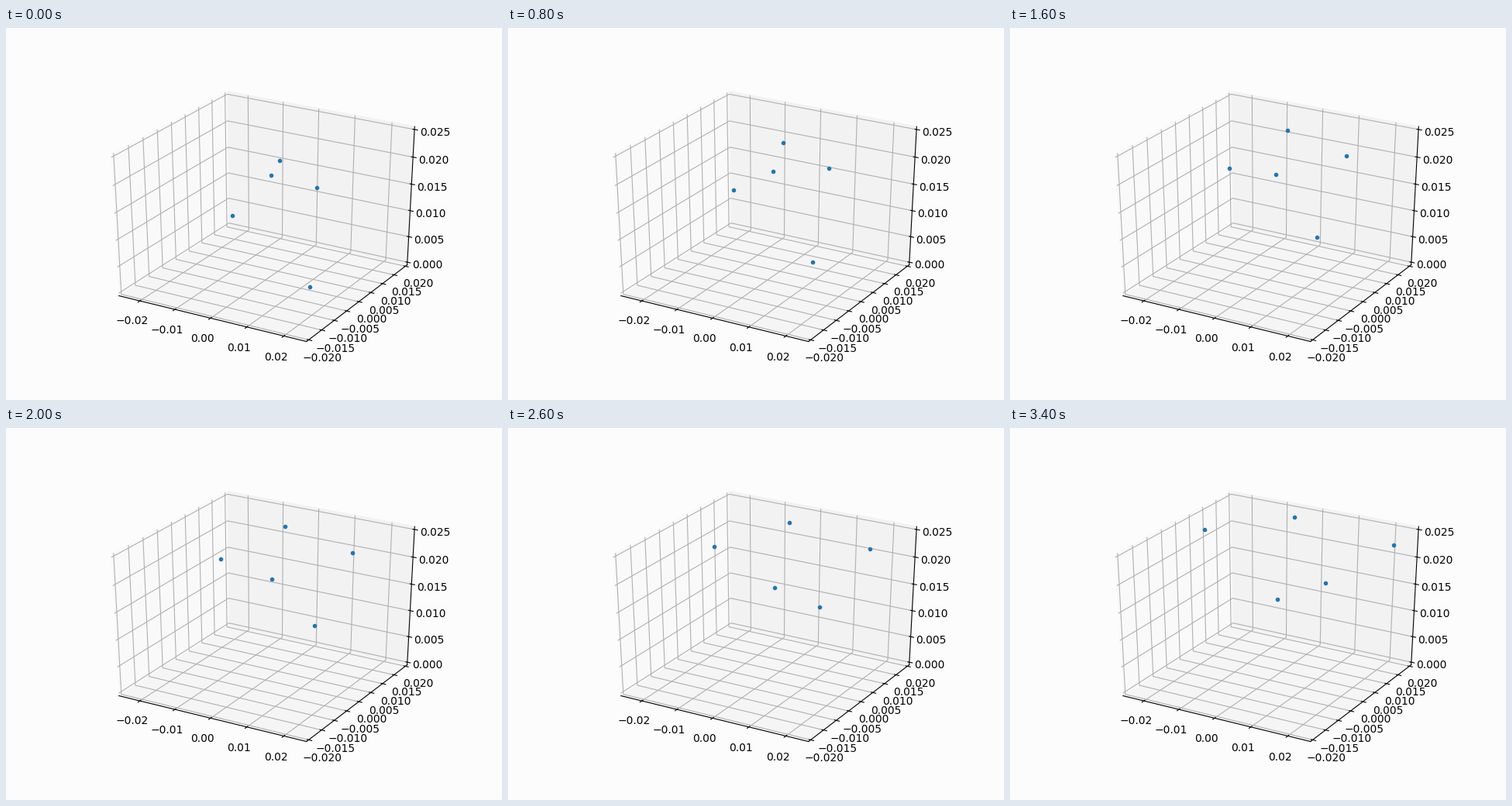
Write a matplotlib script that moves like this. It is 640 px wide and 480 px high and loops after 3.6 s.

```python
import math

import matplotlib.pyplot as plt
import numpy as np
from matplotlib.animation import FuncAnimation
from matplotlib.lines import Line2D
from matplotlib.transforms import IdentityTransform

WIDTH, HEIGHT, DPI = 640, 480, 100
FRAMES, INTERVAL = 18, 200
PAPER = "#fcfcfc"

# Every dot glides at one velocity, then bends smoothly into a second one.
BEND, SOFTNESS = 6, 1.5

# Start, early velocity and late velocity, in pixels from the top left.
DOTS = np.array([
    [(353, 171), (0.5, -6.2), (1.0, -1.7)],
    [(342, 190), (0.1, -1.8), (0.2, 3.8)],
    [(401, 206), (3.0, -6.7), (6.9, -1.35)],
    [(292, 242), (0.0, -8.6), (-3.75, -5.4)],
    [(392, 334), (0.1, -8.0), (1.35, -7.8)],
])


def dots_at(step):
    """Dot positions in display pixels, with y pointing up."""
    start, early, late = DOTS.swapaxes(0, 1)
    after_bend = SOFTNESS * math.log1p(math.exp((step - BEND) / SOFTNESS))
    x, y = (start + early * step + (late - early) * after_bend).T
    return x, HEIGHT - y


def padded(low, high):
    pad = (high - low) / 48
    return low - pad, high + pad


fig = plt.figure(figsize=(WIDTH / DPI, HEIGHT / DPI), dpi=DPI, facecolor=PAPER)
ax = fig.add_axes([0.125, 0.11, 0.775, 0.77], projection="3d", facecolor=PAPER)
ax.view_init(elev=30, azim=-60)
# A cube stretched to the full width of the axes.
ax.apply_aspect = lambda position=None: None
ax.set_box_aspect((1, 1, 1), zoom=math.sqrt(3) / 1.8294640721620434)

ax.set_xticks(np.arange(-2, 3) * 0.01)
ax.set_yticks(np.arange(-4, 5) * 0.005)
ax.set_zticks(np.arange(6) * 0.005)
ax.set_xlim(*padded(-0.025, 0.025))
ax.set_ylim(*padded(-0.02, 0.02))
ax.set_zlim(*padded(0, 0.025))
for axis, grey in ((ax.xaxis, 0.975), (ax.yaxis, 0.95), (ax.zaxis, 0.9625)):
    axis.set_pane_color((grey, grey, grey, 1))

dots = Line2D([], [], linestyle="", marker=".", markersize=6, color="#1f77b4",
              transform=IdentityTransform())
fig.add_artist(dots)


def update(step):
    dots.set_data(*dots_at(step))
    return [dots]


anim = FuncAnimation(fig, update, frames=FRAMES, interval=INTERVAL,
                     init_func=lambda: update(0), repeat=True, repeat_delay=0)
plt.show()
```
